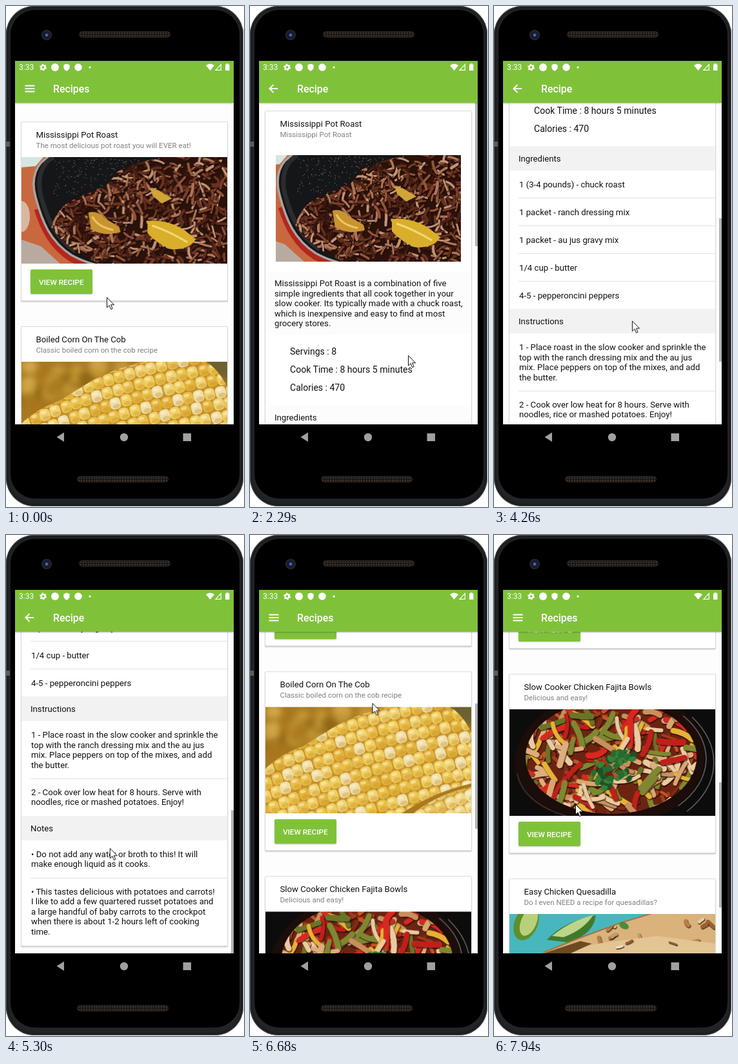
An HTML page with a canvas that plays this animation: 369x776 px, repeating every 8 s.

```html
<!DOCTYPE html>
<html lang="en">
<head>
<meta charset="utf-8">
<title>Recipe app</title>
<style>
@property --s { syntax: '<number>'; inherits: true; initial-value: 0; }
html, body { margin: 0; width: 100%; height: 100%; overflow: hidden; background: #fff; }
body { position: relative; font-family: Roboto, sans-serif; color: #111; }
div, canvas, svg, section { position: absolute; }
#stage { left: 0; top: 0; width: 369px; height: 776px; overflow: hidden; }
.body { inset: 0 1px 1px 0; border-radius: 44px; background: #222426; box-shadow: inset 0 0 0 1px #4c4f51, inset 0 0 4px 2px #151617; }
.glass { inset: 6px 7px 13px 7px; border-radius: 38px; background: #000; }
.notch { left: 0; width: 6px; height: 8px; background: #5a5c5e; }
.speaker { width: 140px; height: 8px; border-radius: 5px; background: radial-gradient(circle, #40352c 0.8px, #1d1917 1.3px) 0 0 / 4px 4px; box-shadow: 0 0 0 1px #2b2725; }
.camera { left: 55px; top: 37px; width: 16px; height: 16px; border-radius: 50%; background: radial-gradient(circle at 50% 50%, #6d7cb0 0 1px, #1d2750 2.5px, #12162b 5px, #26282c 7px); }
.status { left: 14px; top: 85px; width: 339px; height: 20px; background: #7fc23a; }
.window { left: 14px; top: 105px; width: 339px; height: 543px; overflow: hidden; background: #fdfdfd; }
section { inset: 0; isolation: isolate; background: #fdfdfd; }
header { position: absolute; z-index: 1; width: 339px; height: 45px; background: #7fc23a; box-shadow: 0 1px 2px #0004; }
.view { top: 45px; width: 339px; height: 498px; overflow: hidden; }
.page { left: -14px; top: -150px; transform: translateY(calc(var(--s) * -1px)); }
.t { white-space: pre; line-height: 15.47px; }
.card { left: 23px; width: 319px; border: 1px solid #dadada; border-radius: 2px; box-shadow: 0 1.5px 1.5px #0003; background: #fff; }
.btn { left: 38px; width: 96px; height: 38px; border-radius: 2px; background: #7fc23a; box-shadow: 0 1px 2px #0003; }
.band { left: 24px; width: 319px; animation: band 8s infinite step-end; }
.line { left: 38px; width: 305px; height: 1px; background: #e2e2e2; }
.crop { left: 40px; top: 231px; width: 287px; height: 165px; overflow: hidden; }
.thumb { left: 335px; top: 0; width: 4px; background: #b3b3b3; transform: translateY(calc(var(--s) * var(--k) * 1px)); }
.list { animation: list 8s infinite linear; }
.recipe { animation: recipe 8s infinite linear, reveal 8s infinite linear; }
.list .thumb { --k: .3897; height: 194px; animation: listBar 8s infinite linear; }
.recipe .thumb { --k: .4458; height: 222px; animation: recipeBar 8s infinite linear; }
.cursor { left: -1px; top: -1px; animation: cursor 8s infinite linear; }

@keyframes cursor {
  0%, 3.875% { transform: translate(156px, 451px); animation-timing-function: ease-in-out; }
  11.25%, 20.5% { transform: translate(88px, 433px); animation-timing-function: ease-in-out; }
  28.5%, 30.5% { transform: translate(245px, 541px); animation-timing-function: ease-in-out; }
  40.25%, 41% { transform: translate(240px, 187px); animation-timing-function: ease-in-out; }
  50.4%, 51.1% { transform: translate(215px, 520px); animation-timing-function: ease-in-out; }
  60.5%, 61.75% { transform: translate(205px, 222px); }
  66.25% { transform: translate(161px, 484px); }
  69.5% { transform: translate(80px, 681px); }
  70.75%, 73.75% { transform: translate(84px, 668px); animation-timing-function: ease-out; }
  78.5% { transform: translate(182px, 560px); }
  79.25% { transform: translate(180px, 535px); }
  83.75% { transform: translate(190px, 245px); animation-timing-function: ease-in-out; }
  89.4% { transform: translate(250px, 530px); animation-timing-function: ease-in; }
  91.75% { transform: translate(249px, 438px); }
  95% { transform: translate(240px, 270px); animation-timing-function: ease-in-out; }
  99.25%, 100% { transform: translate(126px, 417px); }
}
@keyframes recipe {
  0%, 30.5% { --s: 0; animation-timing-function: ease-in-out; }
  40.25% { --s: 338; animation-timing-function: ease-out; }
  45%, 51.5% { --s: 380; animation-timing-function: ease-in-out; }
  60%, 100% { --s: 620; }
}
@keyframes list {
  0%, 78.6% { --s: 0; }
  79.25% { --s: 11; }
  83.75% { --s: 300; animation-timing-function: ease-out; }
  86.5%, 89.5% { --s: 324; animation-timing-function: ease-in; }
  91.75% { --s: 399; }
  95% { --s: 565; animation-timing-function: ease-out; }
  99.25%, 100% { --s: 598; }
}
@keyframes reveal {
  0%, 19.5% { opacity: 0; transform: translateY(41px); animation-timing-function: ease-out; }
  23.75%, 73.75% { opacity: 1; transform: none; animation-timing-function: ease-in; }
  76.5%, 100% { opacity: 0; transform: translateY(41px); }
}
@keyframes recipeBar { 0%, 66.6% { opacity: 1; } 70%, 100% { opacity: 0; } }
@keyframes listBar { 0%, 78.4% { opacity: 0; } 78.9%, 100% { opacity: 1; } }
@keyframes band { 0% { background: #fcfcfc; } 30.5% { background: #f2f2f2; } 100% { background: #f2f2f2; } }
</style>
</head>
<body>
<div id="stage">
  <div class="body"></div>
  <div class="notch" style="top:210px"></div>
  <div class="glass"></div>
  <div class="camera"></div>
  <div class="speaker" style="left:114px;top:40px"></div>
  <div class="speaker" style="left:111px;top:729px"></div>
  <div class="window">
    <section class="list"><header></header><div class="view"><div class="page"></div><div class="thumb"></div></div></section>
    <section class="recipe"><header></header><div class="view"><div class="page"></div><div class="thumb"></div></div></section>
  </div>
  <div class="status"></div>
  <svg width="369" height="776" fill="#fff">
    <text x="20" y="99" font-size="12">3:33</text>
    <circle cx="57.5" cy="95" r="3" fill="none" stroke="#fff" stroke-width="2.4"/>
    <circle cx="57.5" cy="95" r="4.7" fill="none" stroke="#fff" stroke-width="1.6" stroke-dasharray="2.4 2.52"/>
    <circle cx="76" cy="95" r="6"/>
    <path d="M94 89.5l4.6 1.8v3.5q0 4-4.6 6-4.6-2-4.6-6v-3.5z"/>
    <circle cx="112" cy="95" r="5.8"/>
    <circle cx="130" cy="95" r="1.6"/>
    <path d="M310 92q6.5-5 13 0l-6.5 8z"/>
    <path d="M325 99.3h8.3v-8.8z" fill="none" stroke="#fff" stroke-width="1.2"/>
    <path d="M340 90.5h1.7v-1.3h3v1.3h1.7v9.5h-6.4z"/>
    <g fill="#a0a0a0"><path d="M90 660.5v14.5l-11.5-7.2z"/><circle cx="183" cy="668" r="6.2"/><rect x="274.5" y="662" width="12.5" height="12"/></g>
  </svg>
  <svg class="cursor" width="15" height="22" viewBox="-1 -1 15 22"><path d="M.5.5V16l3.6-3.3 2.6 6 2.4-1-2.5-5.9h5z" fill="#fff" stroke="#111"/></svg>
</div>
<script>
const $ = q => document.querySelector(q);
const box = (cls, top, height, extra = '') => `<div class="${cls}" style="top:${top}px;height:${height}px;${extra}"></div>`;
// cy is the middle of the first line
const text = (x, cy, str, size = 13.2, extra = '') =>
  `<div class="t" style="left:${x}px;top:${cy - 7.7}px;font-size:${size}px;${extra}">${str}</div>`;
const note = (cy, str) => text(46.5, cy, str, 11.55, 'color:#808080');
const pic = (name, style = '') => `<canvas width="320" height="165" data-pic="${name}" style="${style}"></canvas>`;
const bar = (path, title) =>
  `<svg width="339" height="45" fill="none" stroke="#fff" stroke-width="1.8"><path d="${path}"/></svg>` +
  text(59, 23.8, title, 15.9, 'color:#fff;font-weight:500');

$('.list header').innerHTML = bar('M15.5 18.5h15M15.5 23h15M15.5 27.5h15', 'Recipes');
$('.recipe header').innerHTML = bar('M29 23H17M22.5 16.8L16.3 23l6.2 6.2', 'Recipe');

const cards = [
  ['Mississippi Pot Roast', 'The most delicious pot roast you will EVER eat!', 'roast'],
  ['Boiled Corn On The Cob', 'Classic boiled corn on the cob recipe', 'corn'],
  ['Slow Cooker Chicken Fajita Bowls', 'Delicious and easy!', 'fajita'],
  ['Easy Chicken Quesadilla', 'Do I even NEED a recipe for quesadillas?', 'quesadilla']
];
$('.list .page').innerHTML = cards.map(([title, sub, name], i) => {
  const y = 180 + 317 * i;
  return box('card', y - 1, 276) + text(46.5, y + 20, title) + note(y + 37, sub) +
    pic(name, `left:24px;top:${y + 54}px;width:319px;height:165px`) +
    box('btn', y + 228, 38) + text(51, y + 248.3, 'VIEW RECIPE', 11.7, 'color:#fff;font-weight:500');
}).join('');

const bands = [[411, 98], [618, 38], [870, 38], [1055, 38]];
const lines = [698, 741, 784, 827, 997, 1151];
const facts = ['Servings : 8', 'Cook Time : 8 hours 5 minutes', 'Calories : 470'];
const items = ['1 (3-4 pounds) - chuck roast', '1 packet - ranch dressing mix', '1 packet - au jus gravy mix',
  '1/4 cup - butter', '4-5 - pepperoncini peppers'];
$('.recipe .page').innerHTML = box('card', 162, 1093) +
  text(46.5, 183, cards[0][0]) + note(200, cards[0][0]) +
  `<div class="crop">${pic('roast', 'left:-16px')}</div>` +
  bands.map(b => box('band', ...b)).join('') + lines.map(y => box('line', y, 1)).join('') +
  text(38, 429.8, `Mississippi Pot Roast is a combination of five
simple ingredients that all cook together in your
slow cooker. Its typically made with a chuck roast,
which is inexpensive and easy to find at most
grocery stores.`) +
  facts.map((s, i) => text(62, 536 + 28 * i, s, 14.05)).join('') +
  ['Ingredients', 'Instructions', 'Notes'].map((s, i) => text(38, [638, 890, 1075][i], s)).join('') +
  items.map((s, i) => text(39, 677.7 + 43 * i, s)).join('') +
  text(39, 930, `1 - Place roast in the slow cooker and sprinkle the
top with the ranch dressing mix and the au jus
mix. Place peppers on top of the mixes, and add
the butter.`) +
  text(39, 1018.5, `2 - Cook over low heat for 8 hours. Serve with
noodles, rice or mashed potatoes. Enjoy!`) +
  text(39, 1114.7, `• Do not add any water or broth to this! It will
make enough liquid as it cooks.`) +
  text(39, 1172.7, `• This tastes delicious with potatoes and carrots!
I like to add a few quartered russet potatoes and
a large handful of baby carrots to the crockpot
when there is about 1-2 hours left of cooking
time.`);

// food pictures
function seeded(n) {
  return () => (n = (n * 16807) % 2147483647) / 2147483647;
}
function painter(c) {
  const rnd = seeded(4711);
  const span = (a, b) => a + (b - a) * rnd();
  const pick = list => list[Math.floor(rnd() * list.length)];
  const fill = (d, color) => { c.fillStyle = color; c.fill(new Path2D(d)); };
  const line = (d, color, width) => { c.strokeStyle = color; c.lineWidth = width; c.stroke(new Path2D(d)); };
  const oval = (x, y, rx, ry, color, turn = 0) => {
    c.fillStyle = color; c.beginPath(); c.ellipse(x, y, rx, ry, turn, 0, 7); c.fill();
  };
  // a shaded curved strip for every step of n
  const strips = (n, colors, len, wide) => {
    c.lineCap = 'round';
    for (let i = 0; i < n; i++) {
      const x = span(0, 320), y = span(0, 165), a = span(0, 6.3), l = span(len / 2, len), b = a + span(-.9, .9);
      const dx = l * Math.cos(a), dy = l * Math.sin(a), w = span(wide * .6, wide);
      const d = `M${x} ${y}q${dx} ${dy} ${dx + l * Math.cos(b)} ${dy + l * Math.sin(b)}`;
      c.save(); c.translate(.8, 1.4); line(d, '#1c0a0599', w + 1); c.restore();
      line(d, pick(colors), w);
    }
  };
  const inside = (d, draw) => { c.save(); c.clip(new Path2D(d)); draw(); c.restore(); };
  return { c, span, pick, fill, line, oval, strips, inside };
}
const paint = {
  roast({ fill, line, oval, strips, inside, span }) {
    fill('M0 0H320V165H0z', '#c9683f');
    fill('M0 0H34L22 14 0 16z', '#d5e6e2');
    oval(0, 92, 13, 24, '#d8b7a2');
    fill('M0 128L30 138 60 165H0z', '#b9aaa0');
    const rim = 'M46 -2C22 8 14 34 22 62C32 100 44 130 78 152Q96 162 120 168';
    line('M26 80C36 112 50 138 78 156Q96 164 116 170', '#b3261e', 13);
    fill(rim + 'H322V-2z', '#151618');
    line(rim, '#a9a6a3', 3.5);
    line('M50 0C30 10 24 34 30 60C40 96 52 124 84 146', '#2b2c2e', 7);
    for (let i = 0; i < 220; i++) oval(span(50, 190), span(2, 60), .6, .6, '#8a8480');
    inside('M46 108Q58 72 90 62L132 44 150 22 184 8 230 -2H322V168H128Q74 148 46 108z', () => {
      fill('M0 0H320V165H0z', '#2a120b');
      strips(800, ['#4a2015', '#5f2c1c', '#7b3f29', '#94553b', '#ae7658', '#3a170e', '#6a3320', '#c39475'], 10, 4.4);
    });
    fill('M196 99Q225 96 252 112L271 127Q262 143 235 143Q212 136 196 118z', '#d9ae2a');
    line('M203 106Q230 115 258 132', '#f3d870', 3);
    fill('M104 86Q118 82 130 95L152 108 154 116Q130 124 108 112z', '#c99330');
    line('M110 92Q118 108 143 113', '#e9c765', 3);
    fill('M200 48L214 52 234 64 218 72 204 60z', '#d0a436');
  },
  corn({ c, fill, oval, inside, span, pick }) {
    fill('M0 0H320V165H0z', '#a9781f');
    c.filter = 'blur(6px)';
    for (let i = 0; i < 60; i++) oval(span(0, 200), span(0, 60), 11, 9, pick(['#c79a38', '#a97a1e', '#d3aa4c', '#8f6717']));
    oval(318, 2, 34, 26, '#6d6130');
    c.filter = 'none';
    const kernels = (turn, colors) => {
      c.save(); c.translate(160, 80); c.rotate(turn);
      for (let row = -10; row < 11; row++) for (let col = -14; col < 15; col++) {
        const x = col * 17 + (row & 1) * 8 + span(-1, 1), y = row * 19 + col * col * .12;
        c.fillStyle = pick(colors);
        c.beginPath(); c.roundRect(x - 8, y - 9, 16.4, 18.4, 6); c.fill();
        oval(x + 1, y + 5, 6, 3.5, '#c18a1c55');
        oval(x - 1, y - 4, 4.5, 2.6, '#fff6cc88');
      }
      c.restore();
    };
    const gold = ['#e9bf4c', '#f0cf62', '#ebc552', '#e3b43e', '#f0d274', '#f0dfac'];
    inside('M0 96Q22 74 60 60L112 28Q160 4 205 -2H282Q306 8 322 44V118Q260 132 210 166H0z', () => {
      fill('M0 0H320V165H0z', '#c69027');
      kernels(-.28, gold);
    });
    inside('M225 168Q270 133 322 124V168z', () => {
      fill('M0 0H320V165H0z', '#d0a03c');
      kernels(-.45, ['#f0d88a', '#f3e3ab', '#e9c560']);
    });
  },
  fajita({ c, fill, line, oval, strips, inside, span, pick }) {
    fill('M0 0H320V165H0z', '#0d0c0c');
    const bowl = 'M8 82C10 22 80 -28 165 -28S306 18 304 70S262 176 165 176S6 142 8 82z';
    inside(bowl, () => {
      fill('M0 0H320V165H0z', '#1b0d09');
      c.beginPath(); c.ellipse(158, 74, 133, 88, 0, 0, 7); c.clip();
      fill('M0 0H320V165H0z', '#6b2412');
      strips(150, ['#a33a1c', '#c2542a', '#7d2c15'], 12, 7);
      const mix = ['#dcae7c', '#c98f5c', '#ebcaa0', '#d9a670', '#c11f1a', '#d8281f', '#e6b234', '#7f8730', '#697526'];
      strips(190, mix, 21, 9.5);
    });
    line('M12 100C22 146 80 174 160 174', '#3a3634', 1.5);
    line('M270 10C320 50 318 110 262 150M284 12C334 60 326 120 276 158', '#6a6663', 1.5);
    line('M150 112Q142 90 130 82M160 100Q176 80 188 56', '#3b8539', 2);
    [[138, 106], [154, 114], [150, 92], [172, 66], [186, 78], [163, 84], [178, 100], [166, 76]].forEach(([x, y]) => {
      for (let i = 0; i < 7; i++) oval(x + span(-9, 9), y + span(-8, 8), 6, 4, pick(['#276b2f', '#348238', '#1c5227']), span(0, 3));
    });
  },
  quesadilla({ fill, line, oval, strips, inside }) {
    fill('M0 0H320V165H0z', '#48b7bd');
    oval(26, 14, 18, 28, '#5f8f2c', .4);
    oval(30, 12, 12, 23, '#b9d07a', .4);
    fill('M58 40Q84 12 134 2Q132 30 92 44z', '#3f7a2c');
    fill('M66 34Q96 10 130 2Q116 24 84 36z', '#bcd58a');
    const wedge = 'M52 60L112 36 172 14 225 -2H322V168H50z';
    inside(wedge, () => {
      fill('M0 0H320V165H0z', '#d9b27c');
      strips(80, ['#b97f45', '#9c6030', '#e6cda2', '#c99a62'], 7, 6);
      fill('M52 60L150 44 230 34 322 46V168H50z', '#e3c493');
      fill('M50 62L110 42 128 46 84 66z', '#6d4a22');
      strips(24, ['#9a5b2a', '#f2e2bd', '#8c4a26'], 6, 4);
    });
    line('M52 60L112 36 172 14 225 -2', '#a87340', 2);
    oval(178, 18, 8, 5, '#4d8a37', .5);
  }
};
document.querySelectorAll('[data-pic]').forEach(el => paint[el.dataset.pic](painter(el.getContext('2d'))));
</script>
</body>
</html>
```
